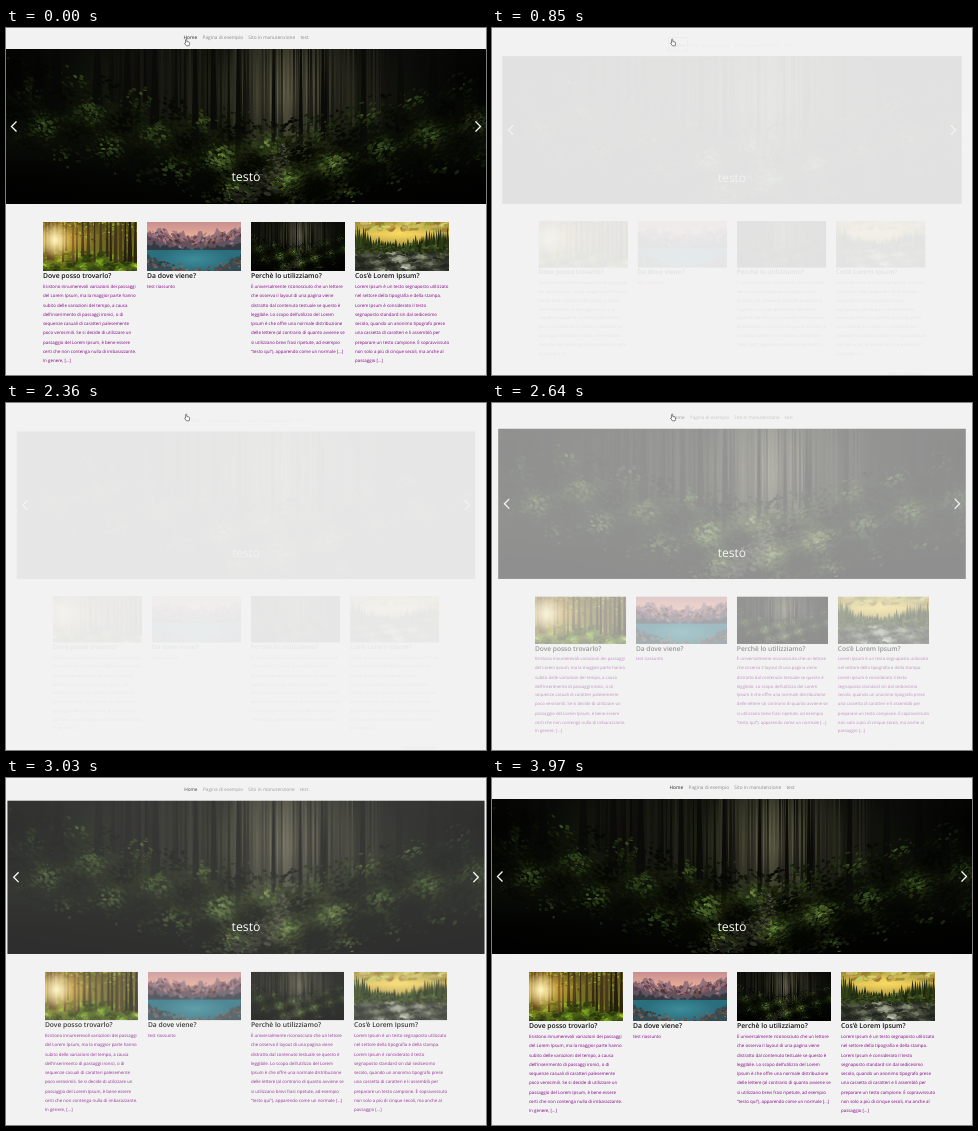
An HTML page with a canvas for the animation above (4000 ms loop, 480 by 347 pixels).

```html
<!DOCTYPE html>
<html lang="it">
<head>
<meta charset="utf-8">
<title>Transizione di pagina</title>
<style>
html, body { margin: 0; width: 100%; height: 100%; overflow: hidden; background: #f2f2f2; }
#stage { position: relative; width: 480px; height: 347px; overflow: hidden; }
#page {
  position: absolute; inset: 0; transform-origin: 240px 174px;
  font-family: "Open Sans", "Noto Sans", sans-serif; text-rendering: geometricPrecision;
}
#page > *, #cursor { position: absolute; white-space: pre; }
.nav { top: 4.8px; font-size: 4.75px; line-height: 10px; color: #8a8a8a; }
.nav.on { color: #222; }
#focus { left: 173px; top: 1px; width: 19px; height: 13px; border: 1px solid #aaa; }
#title { left: 0; width: 480px; top: 141px; font-size: 12.4px; line-height: 16px; text-align: center; color: #fff; }
.head { top: 243.7px; font-size: 6.8px; font-weight: 600; line-height: 8px; color: #111; }
.body { top: 255px; font-size: 4.42px; line-height: 9.25px; color: #800080; }
#more { right: 40px; top: 350px; font-size: 4.4px; line-height: 8px; color: #555; }
.over { z-index: 1; }
svg { left: 0; top: 0; overflow: visible; }
</style>
</head>
<body>
<div id="stage">
  <div id="page">
    <svg class="over" width="480" height="347" fill="none" stroke="#fff" stroke-width="1.3">
      <path d="M10.5 93.500l-5 5 5 5M469.500 93.500l5 5-5 5"/>
    </svg>
    <div id="title" class="over">testo</div>
    <div id="focus"></div>
    <div id="more">Pagina successiva</div>
  </div>
  <svg id="cursor" width="480" height="347" stroke="#333" stroke-width=".6" fill="#fff" stroke-linejoin="round">
    <path id="hand" d="M179.600 15v-3.500q.6-.9 1.200 0v2l2.300.6q.7.300.5 1.200l-.5 2.500h-2.700l-1.800-2.500q.2-.8 1-.3z"/>
    <path id="arrow" d="M180.200 12v5.800l1.300-1.100.9 2 .8-.4-.9-1.900h1.800z"/>
  </svg>
</div>
<script>
const LOOP = 4000;
const $ = id => document.getElementById(id);
const page = $('page');

let seed = 7;
const rnd = (a = 0, b = 1) => {
  seed = (seed * 16807) % 2147483647;
  return a + (b - a) * seed / 2147483647;
};
// Random value that favours the middle of -r..r
const near = r => (rnd() + rnd() - 1) * r;
const hsl = (h, s, l) => `hsl(${h} ${s}% ${l}%)`;

function picture(x, y, w, h, paint) {
  const c = document.createElement('canvas');
  c.width = w;
  c.height = h;
  c.style.cssText = `left:${x}px;top:${y}px`;
  page.append(c);
  paint(c.getContext('2d'), w, h);
  return c;
}

function fade(g, w, h, ...colors) {
  const grad = g.createLinearGradient(0, 0, 0, h);
  colors.forEach((color, i) => grad.addColorStop(i / (colors.length - 1), color));
  g.fillStyle = grad;
  g.fillRect(0, 0, w, h);
}

function glow(g, x, y, rx, ry, rgb, alpha) {
  g.save();
  g.translate(x, y);
  g.scale(rx, ry);
  const grad = g.createRadialGradient(0, 0, 0, 0, 0, 1);
  grad.addColorStop(0, `rgba(${rgb},${alpha})`);
  grad.addColorStop(1, `rgba(${rgb},0)`);
  g.fillStyle = grad;
  g.fillRect(-1, -1, 2, 2);
  g.restore();
}

function leaf(g, x, y, size, tilt, color) {
  g.fillStyle = color;
  g.beginPath();
  g.ellipse(x, y, rnd(.4, 1) * size, rnd(.2, .5) * size, tilt + near(.6), 0, 6.28);
  g.fill();
}

function trunk(g, x, w, bottom, color) {
  g.fillStyle = color;
  g.beginPath();
  g.moveTo(x - w * .35, 0);
  g.lineTo(x + w * .35, 0);
  g.lineTo(x + w * .8, bottom);
  g.lineTo(x - w * .8, bottom);
  g.fill();
}

// Fills everything below the curve y = line(x)
function ridge(g, w, h, color, line) {
  g.fillStyle = color;
  g.beginPath();
  g.moveTo(0, h);
  for (let x = 0; x <= w; x++) g.lineTo(x, line(x));
  g.lineTo(w, h);
  g.fill();
}

// Forest floor: two slopes meeting in the valley
const slope = x => 112 - .25 * Math.abs(x - 275);
// Uneven light, 0 to 1
const patch = (x, y) => (.5 + .5 * Math.sin(x * .08 + y * .05 + 1) * Math.cos(y * .1 - x * .035)) ** 2;

function moss(g, count, place, hue, light) {
  for (let i = 0; i < count; i++) {
    const [x, y] = place();
    const l = 2 + patch(x, y) * rnd(.2, 1) * light;
    leaf(g, x, y, 3, x < 275 ? .4 : -.4, hsl(hue + near(14), 52 - l * .4, l));
  }
}

function darkForest(g, w, h) {
  fade(g, w, h, '#0c0d09', '#0c0f08', '#020301');
  glow(g, 230, 45, 190, 75, '38,42,24', .7);
  glow(g, 284, 42, 75, 85, '112,110,82', .75);
  for (let x = 105; x < 385; x += rnd(2, 5)) {
    const haze = 1 - Math.abs(x - 282) / 180;
    trunk(g, x, rnd(.8, 3), slope(x) - rnd(5, 28), hsl(55, 14, rnd(3, 5 + 16 * haze)));
  }
  glow(g, 284, 50, 35, 55, '132,128,98', .35);
  const hillside = () => {
    const x = rnd(0, w);
    return [x, slope(x) + 8 + near(52)];
  };
  moss(g, 3000, hillside, 88, 28);
  for (let x = 12; x < w; x += rnd(18, 42)) {
    const d = Math.abs(x - 282);
    trunk(g, x, 2.5 + d / 42, slope(x) + rnd(-18, 10), hsl(60, 15, 3.5));
  }
  moss(g, 1200, hillside, 90, 24);
  glow(g, 275, 108, 65, 30, '76,92,42', .4);
  moss(g, 1500, () => [275 + near(95), 122 + near(36)], 84, 42);
  // Stony path winding towards the viewer
  for (let t = 0; t < 1; t += .006) {
    const x = 278 - 45 * t * t + near(5 + 28 * t);
    leaf(g, x, 94 + 58 * t, 1.5 + 3 * t, 0, hsl(55, 12, rnd(5, 34 - 18 * t)));
  }
  for (const x of [0, w]) {
    glow(g, x, h, 210, 65, '0,0,0', .95);
    glow(g, x, 25, 90, 75, '0,0,0', .85);
  }
}

function sunnyForest(g, w, h) {
  fade(g, w, h, '#5b4d1c', '#a08a32', '#718021', '#334c10');
  glow(g, 75, 15, 45, 28, '65,67,22', .75);
  for (let i = 0; i < 550; i++) {
    const x = rnd(0, w), y = rnd(30, h);
    leaf(g, x, y, 3, 0, hsl(78 + near(14), 65, 10 + 28 * patch(x * 3, y * 3) + rnd(0, 10)));
  }
  for (let i = 0; i < 180; i++) {
    leaf(g, rnd(0, w), rnd() ** 2 * 20, 2.5, 0, hsl(rnd(45, 75), 55, rnd(14, 45)));
  }
  for (let x = 3; x < w; x += rnd(3, 7)) {
    trunk(g, x, rnd(1, 3.2), rnd(28, 42), hsl(36, 48, rnd(9, 20)));
  }
  glow(g, 12, 18, 38, 30, '255,190,70', .7);
  glow(g, 12, 18, 16, 18, '255,247,190', 1);
}

function lake(g, w, h) {
  const rough = (x, f) => 3 * Math.sin(x * f) + 2 * Math.sin(x * f * 2.3 + 2) + Math.sin(x * f * 5.1);
  const side = x => Math.abs(x - 47) / 47;
  fade(g, w, h, '#c78f91', '#eeb096', '#c6878b', '#756775');
  ridge(g, w, h, '#97747c', x => 14 - 6 * side(x) + rough(x, .33));
  ridge(g, w, h, '#5e535e', x => 21 - 10 * side(x) + rough(x, .42));
  for (let i = 0; i < 130; i++) {
    const x = rnd(0, w);
    leaf(g, x, 20 - 6 * side(x) + near(8), 3, x < 47 ? .7 : -.7, hsl(rnd(330, 370), 18, rnd(23, 62)));
  }
  ridge(g, w, h, '#343a42', x => 27 - 5 * side(x) + rough(x, .6) * .4);
  ridge(g, w, h, '#2b6e7e', () => 28);
  glow(g, 47, 37, 36, 12, '65,148,161', .8);
  ridge(g, w, h, '#344b53', x => 51 - 20 * side(x) ** 2 + rough(x, .5) * .5);
  for (let i = 0; i < 130; i++) {
    const x = rnd(0, w);
    leaf(g, x, 51 - 11 * side(x) + near(6), 2, 0, hsl(rnd(5, 30), 16, rnd(20, 46)));
  }
}

function river(g, w, h) {
  fade(g, w, h, '#988d3d', '#e8c657', '#9a8b42', '#404b32', '#2d342b');
  glow(g, 45, 10, 32, 13, '255,224,100', .8);
  for (let i = 0; i < 60; i++) leaf(g, rnd(0, w), rnd(0, 9), 5, -.2, hsl(rnd(40, 65), 50, rnd(36, 66)));
  for (let x = -2; x < w + 4; x += rnd(1.5, 3)) {
    const side = Math.abs(x - 43) / 50;
    g.fillStyle = hsl(rnd(74, 96), 46, rnd(9, 20));
    g.beginPath();
    g.moveTo(x, 21 - 17 * side + near(6));
    g.lineTo(x + 3, 31);
    g.lineTo(x - 3, 31);
    g.fill();
  }
  glow(g, 48, 36, 38, 7, '180,184,164', .8);
  for (let i = 0; i < 350; i++) {
    const x = rnd(0, w), y = rnd(30, h);
    const foam = patch(x * 2, y * 5) * (1 - Math.abs(x - 48) / 55);
    leaf(g, x, y, 3.5, 0, hsl(80, 10, 13 + foam * 65));
  }
  for (let i = 0; i < 150; i++) {
    leaf(g, rnd(0, w), 27 + near(6), 2.5, 0, hsl(82, 40, rnd(10, 27)));
  }
}

function text(cls, x, str) {
  const el = document.createElement('div');
  el.className = cls;
  el.style.left = x + 'px';
  el.textContent = str;
  page.append(el);
}

text('nav on', 177.6, 'Home');
text('nav', 196.6, 'Pagina di esempio');
text('nav', 242.2, 'Sito in manutenzione');
text('nav', 294.4, 'test');

const hero = picture(-1, 21, 482, 155, darkForest);
const heroCrop = (g, w, h) => g.drawImage(hero, 125, 0, 298, 155, 0, 0, w, h);

const cards = [
  [sunnyForest, 'Dove posso trovarlo?', `Esistono innumerevoli variazioni dei passaggi
del Lorem Ipsum, ma la maggior parte hanno
subito delle variazioni del tempo, a causa
dell’inserimento di passaggi ironici, o di
sequenze casuali di caratteri palesemente
poco verosimili. Se si decide di utilizzare un
passaggio del Lorem Ipsum, è bene essere
certi che non contenga nulla di imbarazzante.
In genere, [...]`],
  [lake, 'Da dove viene?', 'test riassunto'],
  [heroCrop, 'Perchè lo utilizziamo?', `È universalmente riconosciuto che un lettore
che osserva il layout di una pagina viene
distratto dal contenuto testuale se questo è
leggibile. Lo scopo dell’utilizzo del Lorem
Ipsum è che offre una normale distribuzione
delle lettere (al contrario di quanto avviene se
si utilizzano brevi frasi ripetute, ad esempio
“testo qui”), apparendo come un normale [...]`],
  [river, 'Cos’è Lorem Ipsum?', `Lorem Ipsum è un testo segnaposto utilizzato
nel settore della tipografia e della stampa.
Lorem Ipsum è considerato il testo
segnaposto standard sin dal sedicesimo
secolo, quando un anonimo tipografo prese
una cassetta di caratteri e li assemblò per
preparare un testo campione. È sopravvissuto
non solo a più di cinque secoli, ma anche al
passaggio [...]`]
];
cards.forEach(([paint, head, body], i) => {
  const x = 37 + i * 104;
  picture(x, 194, 94, 49, paint);
  text('head', x, head);
  text('body', x, body);
});

const timing = { duration: LOOP, iterations: Infinity };

const full = { opacity: 1, transform: 'scale(1)' };
const gone = { opacity: 0, transform: 'scale(.95)' };
page.animate([
  { ...full, offset: 0 },
  { ...full, offset: 580 / LOOP, easing: 'ease' },
  { ...gone, offset: 980 / LOOP },
  { ...gone, offset: 2265 / LOOP, easing: 'ease' },
  { ...full, offset: 3765 / LOOP },
  { ...full, offset: 1 }
], timing);

// Shows or hides an element at once, switching at each given time
function toggle(el, shown, ...times) {
  const frames = [0, ...times, LOOP].map((t, i) => ({
    offset: t / LOOP,
    visibility: shown === (i % 2 === 0) ? 'visible' : 'hidden',
    easing: 'steps(1, end)'
  }));
  el.animate(frames, timing);
}
toggle(page, true, 1060, 2360);
toggle($('focus'), false, 430, 1060);
toggle($('hand'), true, 1360, 1610, 2900);
toggle($('arrow'), false, 1360, 1610);
</script>
</body>
</html>
```
